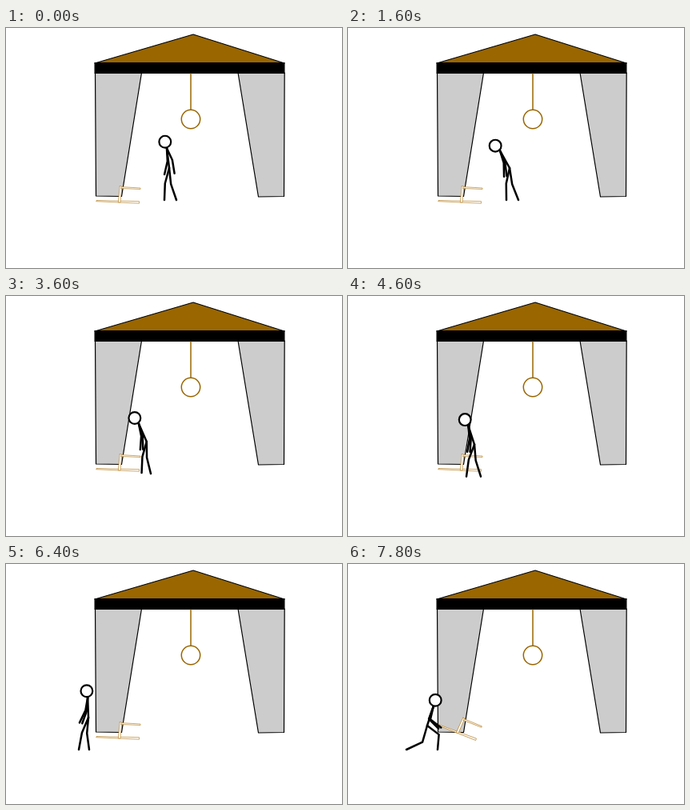
Recreate the animation shown at these times as an HTML page with a canvas. Size 420 px wide and 300 px high, loop 8 s.

```html
<!DOCTYPE html>
<html lang="en">
<head>
<meta charset="utf-8">
<title>Tent and chair</title>
<style>
html, body { margin: 0; width: 100%; height: 100%; overflow: hidden; background: #fff; }
canvas { display: block; }
</style>
</head>
<body>
<canvas id="stage" width="420" height="300"></canvas>
<script>
const ctx = document.getElementById('stage').getContext('2d');
const LOOP = 8000, STEP = 200;
const BROWN = '#996600', WOOD = '#b98730';

// time, hip x, lean in degrees (positive leans left)
const walk = [
  [0, 204, 7], [1600, 202, 29], [2800, 190, 28], [4600, 158, 18], [5600, 118, 16],
  [6000, 104, 14], [6400, 103, 2], [7200, 100, 0], [7800, 99, -18]
];

// time, x of each footfall; the feet take turns
const footfalls = [
  [0, 213], [1600, 198], [2800, 181], [3700, 166], [4600, 148],
  [5100, 131], [5600, 102], [6000, 91], [6400, 104]
];

const mix = (a, b, p) => a + (b - a) * p;
const ramp = (t, a, b) => Math.min(1, Math.max(0, (t - a) / (b - a)));

// Point at a distance from p, at degrees clockwise from straight up.
function polar([x, y], length, degrees) {
  const a = degrees * Math.PI / 180;
  return [x + length * Math.sin(a), y - length * Math.cos(a)];
}

function walkAt(t) {
  const i = Math.max(1, walk.findIndex(k => k[0] >= t));
  const p = ramp(t, walk[i - 1][0], walk[i][0]);
  return walk[i].map((v, j) => mix(walk[i - 1][j], v, p));
}

function footAt(t, side, ground) {
  const last = footfalls.findLastIndex(f => f[0] <= t), next = last + 1;
  const to = footfalls[next];
  if (!to || next % 2 !== side) return [footfalls[last - (last - side) % 2][1], ground];
  const from = footfalls[next - 2] ?? to;
  const p = ramp(t, footfalls[last][0], to[0]);
  const lift = Math.abs(to[1] - from[1]) * 0.1 * Math.sin(Math.PI * p);
  return [mix(from[1], to[1], p), ground - lift];
}

function path(points, closed) {
  ctx.beginPath();
  points.forEach(([x, y]) => ctx.lineTo(x, y));
  if (closed) ctx.closePath();
}

function line(points) {
  path(points);
  ctx.stroke();
}

function shape(points, fill, stroke, width) {
  path(points, true);
  ctx.fillStyle = fill;
  ctx.fill();
  ctx.strokeStyle = stroke;
  ctx.lineWidth = width;
  ctx.stroke();
}

function ring(x, y, r) {
  ctx.beginPath();
  ctx.arc(x, y, r, 0, Math.PI * 2);
}

// Limb whose middle joint is pushed sideways by bend.
function limb(p, q, bend) {
  const dx = q[0] - p[0], dy = q[1] - p[1], d = Math.hypot(dx, dy);
  const joint = [mix(p[0], q[0], 0.49) - dy / d * bend, mix(p[1], q[1], 0.49) + dx / d * bend];
  line([p, joint, q]);
}

function drawTent() {
  shape([[111.5, 56], [169.5, 56], [144.5, 210.5], [112.5, 210]], '#ccc', '#000', 1.2);
  shape([[290, 56], [348.2, 56], [347.5, 210.5], [315.5, 211]], '#ccc', '#000', 1.2);
  shape([[111, 44], [234, 8], [348, 44]], BROWN, '#000', 1.2);
  ctx.fillStyle = '#000';
  ctx.fillRect(110.5, 43, 238, 14);
  ctx.strokeStyle = BROWN;
  ctx.lineWidth = 1.5;
  line([[231, 57], [231, 102]]);
  ring(231, 114, 11.7);
  ctx.stroke();
}

function drawChair(crouch) {
  ctx.save();
  ctx.translate(167 - 6.5 * crouch, 218 + 1.5 * crouch);
  ctx.rotate(crouch * 19 * Math.PI / 180);
  ctx.translate(-167, -218);
  const bar = points => shape(points, '#fff', WOOD, 0.7);
  bar([[113, 215.5], [166.5, 216.7], [166.5, 219.2], [113, 216.7]]);
  bar([[141.8, 197.7], [144.7, 197.7], [143, 218], [140.7, 218]]);
  bar([[144, 198.6], [168, 200], [168, 201.5], [144, 200.5]]);
  ctx.restore();
}

function drawFigure(t, crouch) {
  const [, x, lean] = walkAt(t);
  const turn = ramp(t, 6600, 7800), settle = 1 - ramp(t, 0, 1600);
  const ground = 215 + 17 * ramp(t, 1600, 6400);
  const hip = [x, ground - 40 + 10 * crouch];
  const neck = polar(hip, 25, -lean);
  const head = polar(neck, 8.3, -1.3 * lean - 6);

  const swing = lean + mix(-20, 38, turn) + 8 * settle;
  const spread = mix(6, -7, turn) + 16 * settle;
  const reach = mix(33, 28, crouch);
  const bend = mix(2.3, -9, turn);

  ctx.strokeStyle = '#000';
  ctx.lineWidth = 2.5;
  line([neck, hip]);
  for (const side of [0, 1]) {
    limb(neck, polar(neck, reach, 180 - swing - side * spread), -bend);
    const foot = footAt(t, side, ground);
    foot[0] += crouch * (side ? -18 : 8);
    limb(hip, foot, bend);
  }
  ring(...head, 7.4);
  ctx.fillStyle = '#fff';
  ctx.fill();
  ctx.lineWidth = 2.2;
  ctx.stroke();
}

function frame() {
  const t = Math.floor(performance.now() % LOOP / STEP) * STEP;
  const crouch = ramp(t, 7200, 7800);
  ctx.fillStyle = '#fff';
  ctx.fillRect(0, 0, 420, 300);
  ctx.lineCap = ctx.lineJoin = 'round';
  drawTent();
  drawChair(crouch);
  drawFigure(t, crouch);
  requestAnimationFrame(frame);
}
frame();
</script>
</body>
</html>
```
